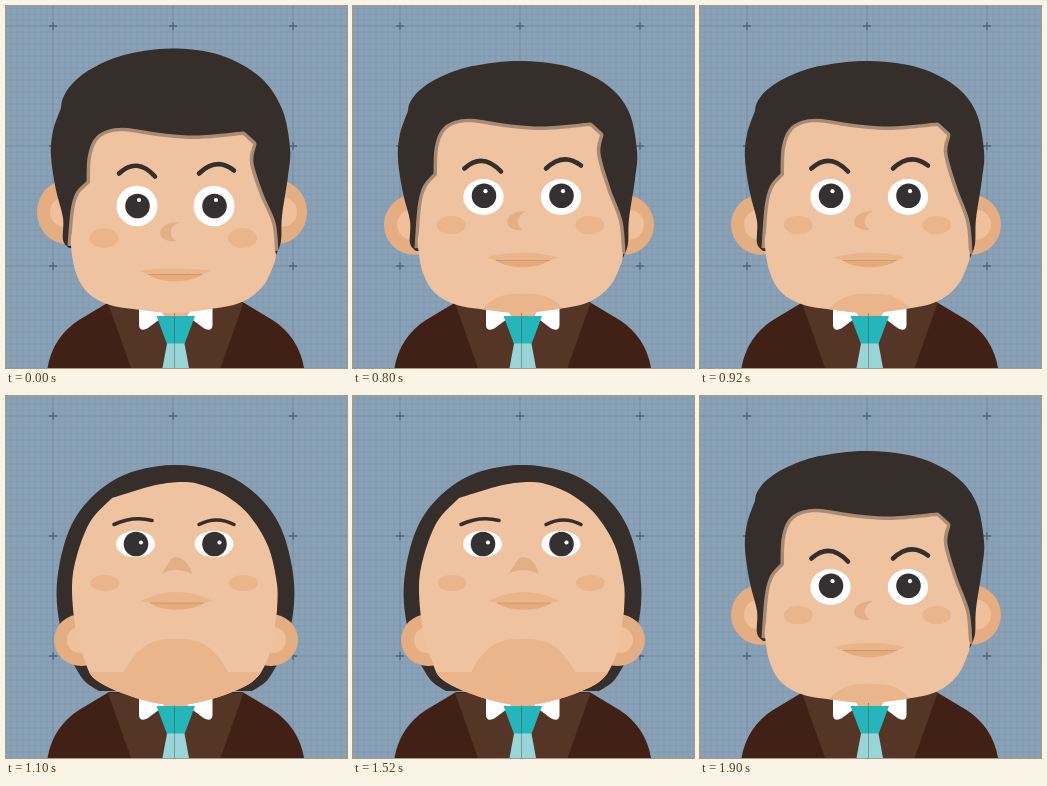
Recreate the animation shown at these times as an HTML page. Size 341x362 px, loop 2000 ms.

```html
<!DOCTYPE html>
<html lang="en">
<head>
<meta charset="utf-8">
<title>Nodding man</title>
<style>
html, body { margin: 0; width: 100%; height: 100%; overflow: hidden; background: #8aa1b6; }
svg { display: block; width: 341px; height: 362px; }
</style>
</head>
<body>
<svg id="stage" viewBox="0 0 341 362" xmlns="http://www.w3.org/2000/svg"></svg>
<script>
const LOOP = 2000;
const SKIN = '#efc3a0', TAN = '#e5ae82', BLUSH = '#ebb58b', HAIR = '#362e2b', SHADE = '#a98b75';

// Height of each feature, from looking ahead to looking up.
const poses = [
  { eye: 200, brow: 167.5, cheek: 232, mouth: 268.5, nose: 226 },
  { eye: 191, brow: 162.5, cheek: 219, mouth: 254.5, nose: 215 },
  { eye: 168, brow: 147, cheek: 193, mouth: 228, nose: 203 },
  { eye: 148, brow: 128.5, cheek: 187, mouth: 207, nose: 178 }
];
// Start time and pose.
const steps = [[0, 0], [800, 1], [1000, 2], [1100, 3], [1800, 2], [1900, 1]];

const clamp = v => Math.min(1, Math.max(0, v));
const path = (d, fill, extra = '') => `<path d="${d}" fill="${fill}" ${extra}/>`;
const oval = (x, y, rx, ry, fill) => `<ellipse cx="${x}" cy="${y}" rx="${rx}" ry="${ry}" fill="${fill}"/>`;
const flip = (sum, art) => `${art}<g transform="matrix(-1 0 0 1 ${sum} 0)">${art}</g>`;

// Smooth line through "x,y" points; "/" marks a corner; warp moves each height.
function curve(text, warp = y => y) {
  const runs = text.split('/').map(run => run.trim().split(/\s+/).map(p => {
    const [x, y] = p.split(',').map(Number);
    return [x, warp(y)];
  }));
  let last = runs[0][0], d = 'M' + last;
  runs.forEach((run, n) => {
    const p = n ? [last, ...run] : run;
    for (let i = 0; i < p.length - 1; i++) {
      const a = p[i - 1] || p[i], b = p[i], c = p[i + 1], e = p[i + 2] || c;
      d += `C${b.map((v, k) => v + (c[k] - a[k]) / 6)} ${c.map((v, k) => v - (e[k] - b[k]) / 6)} ${c}`;
    }
    last = p[p.length - 1];
  });
  return d;
}

function ears(t, ahead) {
  const y = 206 + 38 * t, ry = 32 - 6 * t;
  const [l, r, il, ir, rx, inner] = ahead ? [61, 271, 59, 276, 30, 15] : [75.5, 264.5, 74, 267, 27.5, 13];
  return oval(l, y, rx, ry, TAN) + oval(r, y, rx, ry, TAN) +
    oval(il, y, inner, inner, '#efc09a') + oval(ir, y, inner, inner, '#efc09a');
}

function eyes(y, t, ahead) {
  const py = y - 1.5 * Math.sin(Math.PI * t);
  const gx = ahead ? 2 : 5.5, gy = 6 - 4.5 * t;
  return [131 - 1.5 * t, 208].map(x =>
    oval(x, y, 20.5 - t, 20.3 - 7 * t, '#fff') + oval(x + 0.5, py, 12.3, 12.3, '#343132') +
    oval(x + gx, py - gy, 2.1, 2.1, '#fff')).join('');
}

function brows(y, t, ahead) {
  const arch = 17 - 8 * t ** 3;
  const arc = (x, end, tilt) => `M${x},${y}Q${(x + end) / 2},${y - arch} ${end},${y + tilt}`;
  return path(arc(113 - 5 * t, 149 - 3 * t, ahead ? 3 : -4) + arc(193, 228, ahead ? -3 : 0), 'none',
    `stroke="${HAIR}" stroke-width="${4.6 - t ** 3}" stroke-linecap="round"`);
}

function mouth(y, t, ahead) {
  const l = 142 + 2 * t, r = 196 + 2 * t, m = (l + r) / 2;
  const side = y - 4 + 2 * t, top = y - 6 - 5 * t;
  return path(`M${m - 36},${side}Q${m - 18},${top} ${m},${top}Q${m + 18},${top} ${m + 36},${side}L${r},${y}H${l}Z`, BLUSH) +
    path(`M${l},${y}C${l + 12},${y + 9} ${r - 12},${y + 9} ${r},${y}Z`, '#e5ab7d') +
    path(`M${l},${y}H${r}`, 'none', 'stroke="#cf9967" stroke-width="1.2"');
}

function nose(y, t, ahead) {
  const h = 17 * t;
  return path(ahead
    ? `M173,${y - 10}C149,${y - 10} 148,${y + 11} 170,${y + 9}C162,${y + 3} 163,${y - 5} 173,${y - 10}Z`
    : `M155.5,${y}C162,${y - h / 2} 164,${y - h} 170,${y - h}C178,${y - h} 184,${y - h / 2} 186,${y}Q170,${y - 8} 155.5,${y}Z`,
  '#e2af87');
}

function chin(t) {
  const base = 320 - 44 * t ** 1.5 - 10 * t * (1 - t) * 2, top = 305.5 - 62.5 * t ** 1.15;
  const half = 40 + 12 * t;
  return path(`M60,${base}H${170 - half}C${170 - half / 1.5},${top} ${170 - half / 3},${top} 170,${top}` +
    `S${170 + half / 1.5},${top} ${170 + half},${base}H280V330H60Z`, BLUSH);
}

function headAhead(n) {
  const sink = y => y + n * (3 + 0.158 * Math.max(0, 102 - y));
  const lift = y => y + n * (12 * clamp((y - 170) / 75) - 9);
  const cap = curve('63,242 57,234 57,212 50,184 45,150 47,125 55,102/ 57,92 66,78 85,63 118,49 165,42.5 214,49 254,71 276,103 284,142 282,170 276,210 275,235 270,249', sink);
  const line = curve('65,240 68,205 73,188 84,177/ 85,152 91,135 103,127 121,125.5 150,130 190,133 237,129/ 247,138/ 244,157 254,189 266,217 269,245', lift);
  const jaw = curve('66,226/ 65,240 70,267 82,287 104,299 135,304 168,307 205,303 236,296 257,280 268,258 270,248/ 264,226');
  return {
    back: '',
    hair: path(cap, HAIR) +
      path(line, SKIN, `stroke="${SHADE}" stroke-width="7" stroke-linejoin="round" paint-order="stroke"`),
    face: jaw
  };
}

function headUp(n) {
  const brow = n
    ? '66,194 70,163 84,126 106,102/ 150,89 180,86 202,91 222,101 243,119 262,150 271,188 271,215'
    : '69,200 72,181 79,172/ 78,150 81,136 87,124/ 97,117/ 135,103 172,101 205,104 240,112/ 256,138 266,172 268,205';
  const jaw = '268,235 262,262 246,286 206,303 168,309 130,302 90,284 78,262 70,235 ';
  const cap = curve('215,69 168.5,61 122,69 87,91 64,122 52,163 50,200 58,240 75,274 92,287/ 170,287');
  const locks = path('M66,200L73,222L72,198ZM266,217L273.5,196V212Z', HAIR);
  return {
    back: `<g transform="translate(${n} ${8 * n})">${flip(337, path(cap, HAIR))}</g>`,
    hair: n ? '' : locks,
    face: curve(jaw + brow)
  };
}

function draw(pose, i) {
  const t = i / 3, ahead = i < 2;
  const { back, hair, face } = ahead ? headAhead(i) : headUp(i - 2);
  const skin = path(face, SKIN);
  const front = `<clipPath id="face${i}"><path d="${face}"/></clipPath>` + ears(t, ahead) +
    (ahead ? hair + skin : skin + hair) +
    `<g clip-path="url(#face${i})">${i ? chin(t) : ''}</g>` +
    [98, 236.5].map(x => oval(x + t, pose.cheek, 14.5, 10 - 2 * t, BLUSH)).join('') +
    nose(pose.nose, t, ahead) + mouth(pose.mouth, t, ahead) +
    eyes(pose.eye, t, ahead) + brows(pose.brow, t, ahead);
  return { back, front };
}

function backdrop() {
  const cell = (id, size, color) =>
    `<pattern id="${id}" x="46.5" y="19.5" width="${size}" height="${size}" patternUnits="userSpaceOnUse">` +
    `<path d="M0,0.5H${size}M0.5,0V${size}" stroke="${color}"/></pattern>`;
  const sheet = fill => `<rect width="341" height="362" fill="${fill}"/>`;
  let marks = '';
  for (let x = 47; x < 341; x += 120)
    for (let y = 20; y < 362; y += 120) marks += `M${x - 4},${y}h8M${x},${y - 4}v8`;
  return cell('fine', 6, '#829ab0') + cell('wide', 120, '#768fa6') +
    sheet('#8aa1b6') + sheet('url(#fine)') + sheet('url(#wide)') +
    path(marks, 'none', 'stroke="#4f667e" stroke-width="1.4"');
}

const body = flip(339.5,
  path('M41.5,362C45,341 56,325 73,314L103,296H171V362Z', '#412016') +
  path('M102,297L125,362H171V296Z', '#553526') +
  path('M154,298H171V311H154Z', BLUSH) +
  path('M133,303V319C133,324 137,325 142,322L158,310L154,303Z', '#fff') +
  path('M150.5,310H171V338H161Z', '#24b6ba') +
  path('M161,337.5H171V362H156.5Z', '#98d5d9'));

const heads = poses.map(draw);
const layer = part => heads.map((h, i) => `<g class="pose${i}">${h[part]}</g>`).join('');
const stage = document.getElementById('stage');
stage.innerHTML = backdrop() + layer('back') + body + layer('front');

heads.forEach((_, i) => {
  const frames = [...steps, [LOOP, 0]].map(([time, pose]) =>
    ({ offset: time / LOOP, opacity: pose === i ? 1 : 0, easing: 'steps(1, end)' }));
  stage.querySelectorAll('.pose' + i).forEach(g =>
    g.animate(frames, { duration: LOOP, iterations: Infinity }));
});
</script>
</body>
</html>
```
